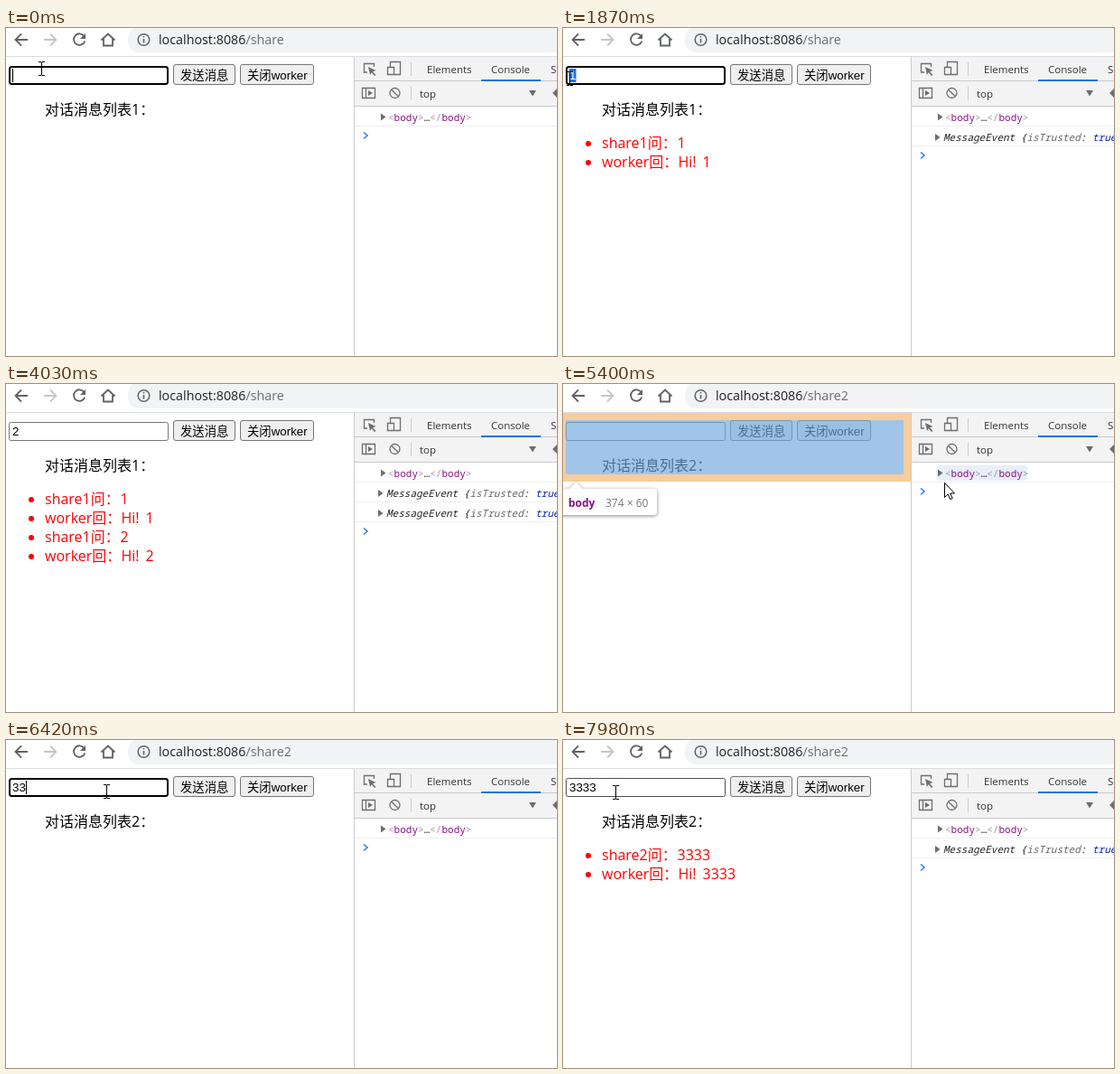
Animation of 610 by 363 pixels, one loop 8000 ms. Source, as an HTML page:

```html
<!DOCTYPE html>
<html lang="zh-CN">
<head>
<meta charset="utf-8">
<style>
html, body { margin: 0; width: 100%; height: 100%; overflow: hidden; background: #fff }
svg { display: block }
text { font: 11.5px "Open Sans", "Noto Sans CJK SC", sans-serif; fill: #333 }
.url { font-size: 14.3px; fill: #202124 }
.page { font-size: 16px; fill: #000 }
.msg { font-size: 16px; fill: #f00 }
.form { font: 13.33px "Liberation Sans", "Noto Sans CJK SC", sans-serif; fill: #000 }
.code { font: 11px "Noto Sans Mono", monospace; fill: #a894a6 }
.code .tag { fill: #881280 }
.event { font-style: italic; fill: #222 }
.icon { fill: none; stroke: #5f6368; stroke-width: 1.8 }
.tool { fill: none; stroke: #6e6e6e; stroke-width: 1.3 }
.tip { font-size: 12px; fill: #777 }
.tip.name { font-weight: 700; fill: #881280 }
</style>
</head>
<body>
<svg width="610" height="363" viewBox="0 0 610 363">
  <!-- address bar -->
  <path d="M610 0H140Q135 5 135 13Q135 27 149 27H610Z" fill="#f1f3f4"/>
  <path d="M0 31.5H610" stroke="#dadce0"/>
  <g class="icon">
    <path d="M24 13H11M17 6.5L10.5 13L17 19.5"/>
    <path d="M42 13H55M49 6.5L55.5 13L49 19.5" stroke="#c4c6c9"/>
    <path d="M86.5 9A6.3 6.3 0 1 0 87.3 14.5"/>
    <path d="M88 6V12H82Z" fill="#5f6368" stroke="none"/>
    <path d="M105.5 13.5L113 6.5L120.5 13.5M108 12V19.5H118V12"/>
    <circle cx="152.5" cy="13" r="6.3" stroke-width="1.5"/>
    <path d="M152.5 12V16.5M152.5 9V10.6" stroke-width="1.6"/>
  </g>
  <text class="url" x="169" y="18">localhost:8086<tspan id="path" fill="#6b6f74"></tspan></text>

  <!-- page -->
  <rect id="field" fill="#fff"/>
  <rect id="selection" x="7" y="45" width="7.5" height="15" fill="#1a73e8"/>
  <text id="value" class="form" x="7" y="57"></text>
  <path id="caret" stroke="#000"/>
  <rect id="send" x="185.5" y="40.5" width="68" height="22" rx="2.5"/>
  <text class="form" x="193" y="57">发送消息</text>
  <rect x="259.5" y="40.5" width="81" height="22" rx="2.5" fill="#efefef" stroke="#767676"/>
  <text class="form" x="267" y="57">关闭worker</text>
  <text id="heading" class="page" x="43" y="96"></text>
  <g id="list"></g>

  <!-- developer panel -->
  <rect x="386" y="32" width="224" height="54" fill="#f3f3f3"/>
  <path d="M385.5 32V363M386 58.5H610M386 86.5H610M448.5 38V53M448.5 65V80" stroke="#cbcbcb" fill="none"/>
  <path d="M526 58H592" stroke="#1a73e8" stroke-width="2"/>
  <g class="tool">
    <path d="M400 49H396.5V39.5H407.5V43"/>
    <path d="M401 43L409.5 47L406 48.2L409.5 52L408 53L404.8 49.2L403 52Z" fill="#6e6e6e" stroke="none"/>
    <path d="M425.5 43V37.5H436.5V51.5H430M422.5 43.5H429.5V51.5H422.5Z"/>
    <path d="M394.5 66.5H408.5V77.5H394.5ZM398.5 67V77"/>
    <path d="M401 69L406 72L401 75Z" fill="#6e6e6e" stroke="none"/>
    <circle cx="430.5" cy="72" r="5.5"/><path d="M426.7 68.2L434.3 75.8"/>
  </g>
  <text x="466" y="50">Elements</text>
  <text x="537" y="50">Console</text>
  <text x="603" y="50">S</text>
  <text x="458" y="77">top</text>
  <path d="M579 69H587L583 75.5ZM610 67L605 72L610 77Z" fill="#6e6e6e"/>
  <rect id="rowGlow" x="413" y="90" width="101" height="17" rx="4" fill="#e8eefa"/>
  <path d="M415 94.5L420.5 98.5L415 102.5Z" fill="#6e6e6e"/>
  <text class="code" x="423" y="103">&lt;<tspan class="tag">body</tspan>&gt;<tspan fill="#222">…</tspan>&lt;/<tspan class="tag">body</tspan>&gt;</text>
  <path d="M386 108.5H610" stroke="#f0f0f0"/>
  <g id="log"></g>
  <path id="prompt" d="M396 115.5L400 119L396 122.5" fill="none" stroke="#367cf1" stroke-width="1.6"/>

  <!-- element highlight -->
  <g id="overlay">
    <path d="M0 32H385V108H0ZM3 40V100H377V40Z" fill="#f6b26b" fill-opacity=".66"/>
    <rect x="3" y="40" width="374" height="60" fill="#6fa8dc" fill-opacity=".66"/>
    <path d="M-3 116H7L14.5 108.5L22 116H101Q104 116 104 119V142Q104 145 101 145H-3Z" fill="#fff" style="filter:drop-shadow(0 1px 2px #0007)"/>
    <text class="tip name" x="6" y="136">body</text>
    <text class="tip" x="47" y="136">374 × 60</text>
  </g>

  <g id="pointer">
    <path id="arrow" d="M.5 .5V16.5L4.2 13L6.7 18.7L9.2 17.6L6.7 12H11.5Z" fill="#fff" stroke="#000"/>
    <path id="beam" d="M-3 -7.5H0L.5 -7L1 -7.5H4M.5 -7V7M-3 7.5H0L.5 7L1 7.5H4" fill="none" stroke="#000"/>
  </g>
</svg>
<script>
const $ = id => document.getElementById(id);
const show = (id, on) => $(id).setAttribute('visibility', on ? 'visible' : 'hidden');
const set = (id, attrs) => { for (const k in attrs) $(id).setAttribute(k, attrs[k]); };
const within = (t, spans) => spans.some(([a, b]) => t >= a && t < b);
const latest = (t, steps) => steps.filter(s => t >= s[0]).pop()[1];

const ease = {
  in: u => u * u,
  out: u => u * (2 - u),
  both: u => u * u * (3 - 2 * u),
  flat: u => u
};
// time, x, y and the easing used to get there
const route = [
  [0, 39, 45], [350, 39, 45], [1000, 200, 47, 'both'],
  [1300, 200, 47], [1680, 24, 53, 'both'], [1930, 4, 56, 'both'],
  [2300, 4, 56], [2620, 144, 63, 'in'], [2920, 205, 47, 'out'],
  [3940, 205, 47], [4030, 430, 1, 'flat'],
  [5339, 532, 96], [5400, 423, 109, 'flat'], [5860, 111, 57, 'out'],
  [6750, 111, 57], [7190, 204, 48, 'both'],
  [7520, 204, 48], [7980, 58, 58, 'both'], [8001, 58, 58]
];
const typed = [[0, ''], [350, '1'], [2300, '2'], [5100, ''], [6210, '3'], [6420, '33'], [6600, '333'], [6750, '3333']];
const counts = [[0, 0], [1050, 1], [3040, 2], [5100, 0], [7290, 1]];
const focused = [[0, 990], [1690, 2960], [5930, 7220]];
const pressed = [[990, 1050], [2960, 3040], [7220, 7290]];

function pointerAt(t) {
  const i = route.findIndex(k => k[0] > t);
  const [t0, x0, y0] = route[i - 1], [t1, x1, y1, kind = 'flat'] = route[i];
  const u = ease[kind]((t - t0) / (t1 - t0));
  return [x0 + (x1 - x0) * u, y0 + (y1 - y0) * u];
}

function listMarkup(count, name, second) {
  let html = '';
  for (let i = 0; i < count * 2; i++) {
    const n = second ? '3333' : 1 + (i >> 1), y = 133 + 21 * i;
    const [who, body] = i % 2
      ? ['worker回：', `<tspan x="127.5">Hi!</tspan><tspan x="154.5">${n}</tspan>`]
      : [name + '问：', `<tspan x="126.5">${n}</tspan>`];
    html += `<circle cx="28" cy="${y - 5}" r="3" fill="#f00"/>
      <text class="msg" x="43" y="${y}">${who}${body}</text>`;
  }
  return html;
}

function logMarkup(count) {
  let html = '';
  for (let i = 0; i < count; i++)
    html += `<g transform="translate(0 ${22 * i})">
      <path d="M412 117L417.5 121L412 125Z" fill="#6e6e6e"/>
      <text class="code event" x="421" y="125">MessageEvent {<tspan fill="#666">isTrusted</tspan>: <tspan fill="#0d22aa">true</tspan>, data</text>
      <path d="M386 130.5H610" stroke="#f0f0f0"/></g>`;
  return html;
}

let drawn = '';
function draw(t) {
  const second = t >= 5100, count = latest(t, counts), text = latest(t, typed);
  const key = second + ' ' + count;
  if (key !== drawn) {
    drawn = key;
    $('path').textContent = second ? '/share2' : '/share';
    $('heading').textContent = `对话消息列表${second ? 2 : 1}：`;
    $('list').innerHTML = listMarkup(count, second ? 'share2' : 'share1', second);
    $('log').innerHTML = logMarkup(count);
    set('prompt', { transform: `translate(0 ${22 * count})` });
  }

  const [x, y] = pointerAt(t);
  const visible = !within(t, [[4025, 5340]]);
  const overField = visible && x >= 3 && x < 181 && y > 41 && y < 63;
  const overSend = visible && x >= 185 && x < 254 && y > 40 && y < 63;
  show('pointer', visible);
  set('pointer', { transform: `translate(${Math.round(x)} ${Math.round(y)})` });
  set('arrow', { display: overField ? 'none' : 'inline' });
  set('beam', { display: overField ? 'inline' : 'none' });

  const focus = within(t, focused), press = within(t, pressed);
  const selected = t > 1690 && t < 2300 && x < 11;
  const edge = over => over ? '#4f4f4f' : '#767676';
  set('field', focus
    ? { x: 4, y: 43, width: 175, height: 19, rx: 2.5, stroke: '#000', 'stroke-width': 2 }
    : { x: 3.5, y: 42.5, width: 176, height: 20, rx: 2, stroke: edge(overField), 'stroke-width': 1 });
  set('send', press
    ? { fill: '#f5f5f5', stroke: '#8d8d8d' }
    : { fill: overSend ? '#e5e5e5' : '#efefef', stroke: edge(overSend) });
  $('value').textContent = text;
  $('value').style.fill = selected ? '#fff' : '#000';
  show('selection', selected);
  show('caret', focus && !selected);
  set('caret', { d: `M${Math.round(7 + 7.41 * text.length) + .5} 45V60` });

  const inspect = within(t, [[5345, 5450]]);
  show('overlay', inspect);
  show('rowGlow', inspect);
}

function tick() {
  draw(performance.now() % 8000);
  requestAnimationFrame(tick);
}
tick();
</script>
</body>
</html>
```
